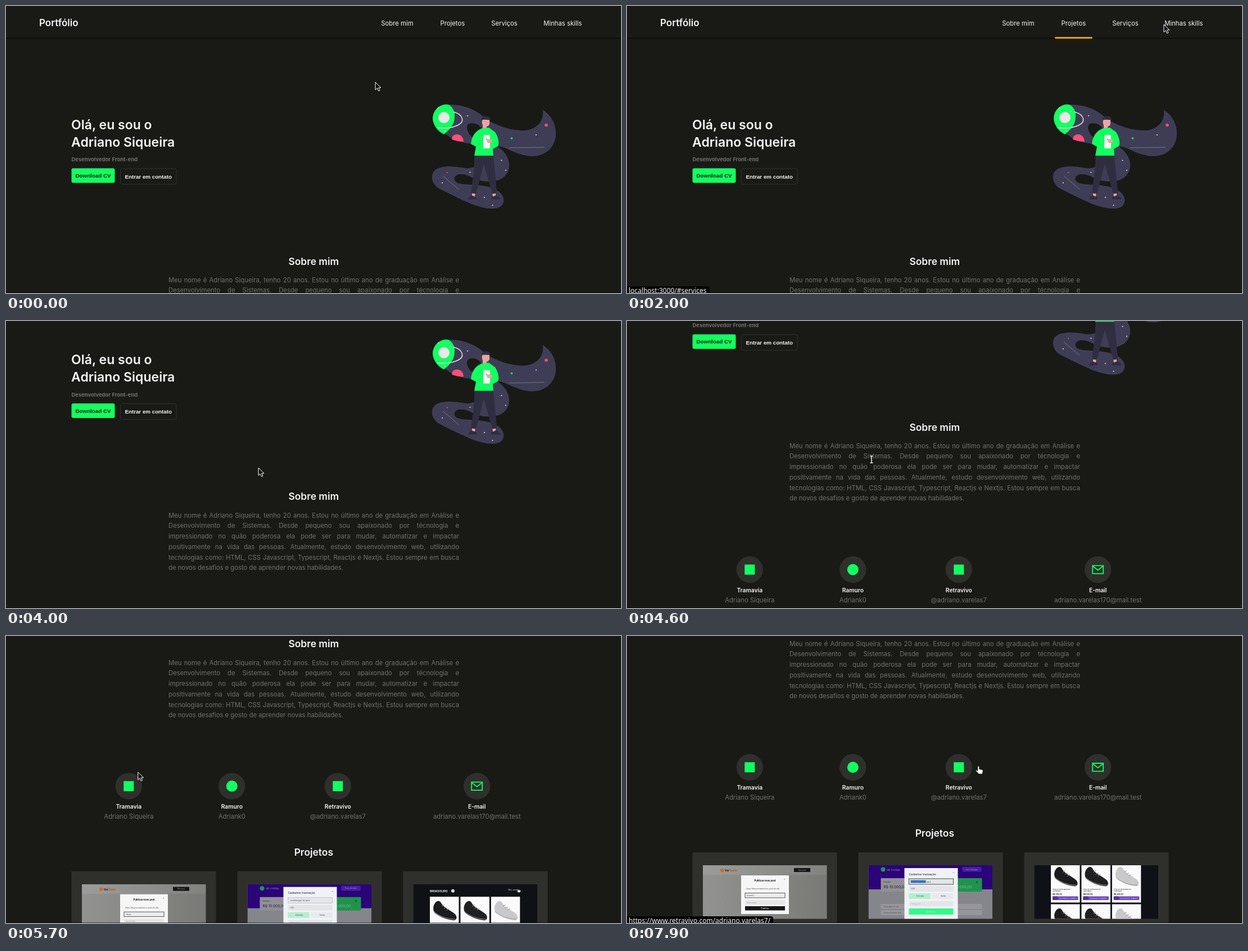
An HTML page for the animation above (8000 ms loop, 1094x512 px).

```html
<!DOCTYPE html>
<html lang="pt-BR">
<head>
<meta charset="utf-8">
<title>Portfólio</title>
<style>
html, body { margin: 0; width: 100%; height: 100%; overflow: hidden; background: #191a16; }
body { position: relative; font-family: Inter, sans-serif; }
#page, #page > svg, #cursor { position: absolute; left: 0; top: 0; }
#page { width: 1094px; height: 1000px; }
svg { font-family: Inter, sans-serif; fill: #f5f5f5; }
#about { position: absolute; left: 289px; top: 479.5px; width: 517px; font-size: 11.3px; line-height: 18.75px; color: #70716d; }
#about div { text-align: justify; text-align-last: justify; white-space: nowrap; height: 18.75px; }
#about div:last-child { text-align-last: left; }
#status { position: absolute; left: 0; top: 500px; height: 12px; padding: 0 5px 0 3px; overflow: hidden;
  background: #060606; color: #f2f2f2; border-radius: 0 4px 0 0; font: 12px/15px "Noto Sans", sans-serif; white-space: nowrap; }
#edge { position: absolute; left: 0; top: 510.5px; width: 100%; height: 1.5px; background: #0008; }
.c { text-anchor: middle; }
.h { font-size: 17.4px; font-weight: 600; }
.g { fill: #70716d; }
.btn { font: bold 9.77px "Liberation Sans", Arial, sans-serif; }
</style>
</head>
<body>
<div id="page">
<svg width="1094" height="1000">
  <rect y="57" width="1094" height="1.2" fill="#060606"/>
  <text x="59" y="36" font-size="17" font-weight="600">Portfólio</text>
  <g id="nav" class="c" font-size="11.3"></g>
  <rect id="line" y="55.3" height="2.9" rx="1.4" fill="#eda321"/>

  <g font-size="23" font-weight="600">
    <text x="116" y="219.5">Olá, eu sou o</text>
    <text x="116" y="250.5">Adriano Siqueira</text>
  </g>
  <text class="g" x="116.5" y="277" font-size="9.45" font-weight="700">Desenvolvedor Front-end</text>
  <rect x="116.5" y="289.5" width="77" height="26" rx="3" fill="#13ff60"/>
  <text class="btn c" x="155" y="306" fill="#191a16">Download CV</text>
  <rect x="203.5" y="290" width="99.5" height="28" rx="3" fill="none" stroke="#32332f"/>
  <text class="btn c" x="253.2" y="307.5">Entrar em contato</text>

  <g id="art">
    <path fill="#3f3d56" d="M787 176C815 175 836 186 850 198C872 216 905 223 925 222C948 218 957 203 955 185C972 197 979 213 978 231C976 254 958 268 936 268C908 267 893 252 872 249C890 260 896 274 895 288C892 306 876 314 856 313C832 312 826 300 808 300C796 301 794 312 804 316C822 321 850 316 872 328C886 336 889 348 881 357C870 366 845 360 825 352C805 343 785 333 771 326C757 318 755 303 761 295C770 284 795 285 815 289C832 292 845 282 848 268L838 246C815 246 795 240 782 228C765 214 765 180 787 176Z"/>
    <path fill="#191a16" d="M820 216C820 208 832 207 840 212L850 222 832 236C824 231 820 223 820 216Z"/>
    <path fill="#13ff60" d="M787 176C777 173 759 182 759 201C760 213 768 224 779 229C788 222 798 212 798 198C799 188 794 179 787 176Z"/>
    <circle cx="779" cy="199" r="10" fill="#e8e8e8"/>
    <path fill="none" stroke="#e6e6e6" stroke-width="1.4" d="M796 189C812 193 818 206 803 213C792 218 778 219 768 217"/>
    <path fill="#fb4f78" d="M793 238C793 226 813 225 814 242Q803 242 793 238Z"/>
    <path fill="none" stroke="#77767f" d="M895 253 958 252M777 303 805 327"/>
    <circle cx="961" cy="212.5" r="2.8" fill="#fb4f78"/><circle cx="785" cy="297" r="1" fill="#fb4f78"/>
    <circle cx="899.5" cy="236" r="1.8" fill="#13ff60"/>
    <g id="stars"></g>
    <path fill="#eba5a0" d="M847 203h13v8q-2 4-5 4v6h-7v-8q-2-4-1-10ZM829 331h6l-1 9h-5ZM865 331h6v9h-5Z"/>
    <path fill="#2f2e41" d="M846 205Q844 197 853 196.500Q863 197 862 204L860 202H849ZM833 266H867C869 290 872 315 873 334L865 335 850 282 836 335 827 334C830 310 834 290 833 266ZM822 345Q822 340 829 338L837 341V345ZM863 345V341L871 338Q880 340 880 345Z"/>
    <path fill="#13ff60" d="M847 218 859 217 870 225C876 234 878 246 875 250L866 255 867 267H833L836 251 827 246C828 235 833 223 847 218Z"/>
    <rect x="849" y="230" width="12" height="24" rx="1.500" fill="#f5f5f5"/>
    <circle cx="855" cy="238" r="1.500" fill="#13ff60"/><ellipse cx="860" cy="241" rx="4.500" ry="3.500" fill="#eba5a0"/>
  </g>

  <text class="h c" x="547.3" y="461.5">Sobre mim</text>
  <g id="social" class="c"></g>
  <text class="h c" x="547.3" y="833">Projetos</text>
  <g fill="#2f302c"><path d="M116.500 861h257v139h-257ZM411.500 861h257v139h-257ZM706.500 861h257v139h-257Z"/></g>

  <svg x="135" y="884" width="220.500" height="95.500" font-size="3.600">
    <defs><linearGradient id="dim"><stop stop-color="#9c9c9a"/><stop offset="1" stop-color="#82827f"/></linearGradient></defs>
    <rect width="221" height="96" fill="url(#dim)"/>
    <rect y="17" width="221" height="79" fill="#0001"/>
    <circle cx="34" cy="9" r="3" fill="#d9640f"/>
    <text x="38.500" y="11" font-size="5.200" font-weight="700" fill="#27221c">Vai<tspan fill="#b0560f">Texto</tspan></text>
    <rect x="162" y="5" width="29" height="7" fill="#151515"/>
    <text class="c" x="176.500" y="9.700" font-size="2.800" fill="#aaa">Novo post</text>
    <rect x="68" y="18" width="85" height="69" fill="#f6f6f6"/>
    <g fill="#444">
      <text x="144" y="26" font-size="4">×</text>
      <text class="c" x="110.500" y="29" font-size="4.200" font-weight="700" fill="#111">Publicar novo post</text>
      <text x="77" y="43" font-size="3.200">https://blog.exemplo/novo-post-do-dia</text>
      <rect x="75" y="49.500" width="71" height="8.500" fill="#ececec" stroke="#333" stroke-width=".8"/>
      <text id="typed" x="78" y="55"></text>
      <rect x="75" y="62" width="71" height="8.500" fill="#e6e6e6"/>
      <text x="78" y="67.500" fill="#999">Descrição</text>
      <rect x="75" y="73" width="71" height="7.500" fill="#161616"/>
      <text class="c" x="110.500" y="78" fill="#fff">Publicar</text>
    </g>
  </svg>

  <svg x="429.500" y="884" width="220.500" height="95.500" font-size="3.600">
    <rect width="221" height="96" fill="#85868c"/><rect width="221" height="43" fill="#2b0478"/>
    <circle cx="26" cy="7.500" r="4" fill="#189a4c"/>
    <text x="33" y="9.500" font-size="5" fill="#918aa8">ab contas</text>
    <rect x="167" y="3" width="34" height="8.500" rx="1" fill="#4620a2"/>
    <text class="c" x="184" y="8.500" font-size="2.800" fill="#9a8dc0">Nova transação</text>
    <rect x="22" y="23" width="60" height="24" rx="1" fill="#909096"/>
    <text x="27" y="31" font-size="3" fill="#333">Entradas</text>
    <text x="27" y="41" font-size="6.500" fill="#252535">R$ 10.000,00</text>
    <rect x="140" y="23" width="62" height="24" rx="1" fill="#1f934c"/><circle cx="193" cy="30" r="2" fill="#126b35"/>
    <text x="146" y="41" font-size="6.500" fill="#87b397">R$ 8.000,00</text>
    <g fill="#96969c"><path d="M22 69h180v9H22ZM22 80h180v9H22Z"/></g>
    <g font-size="3" fill="#4b4b5c"><text x="27" y="75">Publicidade de site</text><text x="27" y="86">Desenvolvimento web</text></g>
    <rect x="64" y="5" width="95" height="91" fill="#f0f2f5"/>
    <g fill="#454a5e">
      <text x="72" y="17.500" font-size="4.900" font-weight="600">Cadastrar transação</text><text x="150" y="14">×</text>
      <rect id="field" x="72" y="24" width="79" height="10" fill="#e3e5e9"/>
      <rect id="sel" x="75" y="26.500" width="27" height="5" fill="#3978d8"/>
      <text x="76" y="30.500">contribuição de abril</text>
      <rect x="72" y="37" width="79" height="10" fill="#e3e5e9"/><text x="76" y="43.300">500</text>
      <rect x="72" y="50" width="38" height="10" fill="#b2efcd"/><text class="c" x="92" y="56.300">Entrada</text>
      <rect x="113" y="50" width="38" height="10" fill="#e8e9ed"/><text class="c" x="133" y="56.300">Saída</text>
      <rect x="72" y="64" width="79" height="9" fill="#e3e5e9"/><text x="76" y="70" fill="#a5a8b4">Categoria</text>
      <rect x="72" y="77" width="79" height="11" rx="1" fill="#32f98a"/><text class="c" x="111" y="83.800" fill="#bfffd9">Cadastrar</text>
    </g>
  </svg>

  <svg x="724.500" y="884" width="220.500" height="95.500">
    <rect width="221" height="96" fill="#101116"/>
    <g id="shop">
      <text x="29.500" y="14" font-size="4.600" font-weight="700">BRISKSOLERS</text>
      <circle cx="70.500" cy="12" r="3" fill="#ddd"/>
      <text x="169" y="11.500" font-size="3.200">Meu carrinho</text><path d="M185 11h6l-1 3.500h-4Z"/>
    </g>
  </svg>
</svg>
<div id="about">
  <div>Meu nome é Adriano Siqueira, tenho 20 anos. Estou no último ano de graduação em Análise e</div>
  <div>Desenvolvimento de Sistemas. Desde pequeno sou apaixonado por técnologia e</div>
  <div>impressionado no quão poderosa ela pode ser para mudar, automatizar e impactar</div>
  <div>positivamente na vida das pessoas. Atualmente, estudo desenvolvimento web, utilizando</div>
  <div>tecnologias como: HTML, CSS Javascript, Typescript, Reactjs e Nextjs. Estou sempre em busca</div>
  <div>de novos desafios e gosto de aprender novas habilidades.</div>
</div>
</div>
<div id="edge"></div>
<div id="status"></div>
<svg id="cursor" width="1094" height="512"><path id="pointer"/></svg>

<script>
const $ = id => document.getElementById(id);
const add = (id, markup) => $(id).insertAdjacentHTML('beforeend', markup);

const nav = [['Sobre mim', 696], ['Projetos', 794.3], ['Serviços', 886.5], ['Minhas skills', 990.3]];
nav.forEach(([label, x]) => add('nav', `<text x="${x}" y="34.500">${label}</text>`));
// Left edge and width of the underline below each menu item
const lines = [[655.5, 82], [761, 67], [852, 69.5], [945, 91]];

[[821, 196], [943, 230], [881.5, 275.5], [889, 293], [825.5, 296.5], [776, 315.5], [851, 341.5], [865.5, 355.5],
 [769, 182], [790, 188], [781, 223]]
  .forEach(([x, y]) => add('stars', `<circle cx="${x}" cy="${y}" r="1"/>`));

const square = '<rect x="-9" y="-9" width="18" height="18" fill="#13ff60"/>';
const disc = '<circle r="10" fill="#13ff60"/>';
const mail = '<path d="M-9.500-7.200h19v14.400h-19ZM-9.500-6.500 0 1 9.500-6.500" fill="none" stroke="#13ff60" stroke-width="1.800"/>';
[[218.3, 'Tramavia', 'Adriano Siqueira', square], [401.8, 'Ramuro', 'Adriank0', disc],
 [590.3, 'Retravivo', '@adriano.varelas7', square], [837.7, 'E-mail', 'adriano.varelas170@mail.test', mail]]
  .forEach(([x, name, user, icon]) => add('social', `<g transform="translate(${x} 709.200)">
    <circle r="23.700" fill="#2f302c"/>${icon}
    <text y="40" font-size="10.300" font-weight="600">${name}</text>
    <text class="g" y="58" font-size="11.300">${user}</text></g>`));

const shoes = [['#1c1c1e', '179,90'], ['#202022', '139,90'], ['#c9c9cb', '219,90']];
for (let row = 0; row < 2; row++) shoes.forEach(([color, price], i) => add('shop',
  `<g transform="translate(${29.5 + i * 54.4} ${22.5 + row * 74})" font-size="2.700" fill="#222">
    <rect width="51.500" height="71" fill="#fafafa"/>
    <path fill="${color}" d="M8 13C12 6 18 6 20 11C26 21 36 23 45 31C49 36 48 41 43 42C29 41 14 34 8 28C5 22 6 17 8 13Z"/>
    <path fill="none" stroke="#999" stroke-width="1" d="M7 26C15 34 30 40 45 40M21 17l5-3M25 21l5-3M29 24l5-3"/>
    <text x="3" y="48.500">Tênis de caminhada leve</text><text x="3" y="51.800">confortável</text>
    <text x="3" y="57" font-size="3.500" font-weight="700">R$ ${price}</text>
    <rect x="3" y="60" width="45.500" height="6.500" rx="1" fill="#6a45b8"/><rect x="3" y="60" width="9" height="6.500" rx="1" fill="#533591"/>
    <text class="c" x="30" y="64.300" font-size="2.500" fill="#fff">ADICIONAR AO CARRINHO</text></g>`));

const shapes = {
  arrow: ['M0 0V13.500L3.300 10.600 5.600 15.600 8 14.600 5.700 9.800H10Z', '#111', '#fff', 1],
  hand: ['M2 1.200Q3.300-.6 4.400 1V5.500L10 6.800Q11.300 7.200 11 9L10 14H4L-1.500 8.500Q-1 6.800 .8 7.800L2 8.800Z', '#fff', '#222', .5],
  beam: ['M-2.500-6H2.500M0-6V6M-2.500 6H2.500', 'none', '#eee', 1.5]
};
const moves = [[0, 657, 136], [100, 679, 110], [200, 679, 110], [400, 686, 58], [500, 692, 37], [700, 706, 33],
  [900, 782, 31], [1100, 834, 35], [1300, 878, 34], [1500, 950, 33], [1700, 992, 35], [1900, 992, 35],
  [2000, 955, 33], [2200, 800, 92], [2500, 450, 215], [2800, 212, 275], [3100, 340, 245], [3300, 449, 262],
  [4300, 449, 262], [4600, 435, 247], [5200, 276, 250], [5400, 273, 252], [5800, 222, 240], [6100, 214, 232],
  [6400, 230, 217], [6700, 345, 240], [7000, 398, 236], [7100, 398, 236], [7300, 424, 219], [7600, 540, 226], [7900, 622, 232]];
const scrolls = [[3500, 0], [3600, 14], [4000, 142.5], [4100, 158], [4300, 158], [4400, 176], [4600, 265.7],
  [4700, 281], [4900, 357], [5000, 370], [5400, 370], [5500, 388], [5800, 468], [5900, 475]];
const shopScroll = [[7100, 0], [7500, 27]];
const hover = [[0, -1], [500, 0], [800, 1], [1200, 2], [1500, 3], [2000, 1], [2200, -1]];
const kinds = [[0, 'arrow'], [500, 'hand'], [800, 'arrow'], [900, 'hand'], [1100, 'arrow'], [1300, 'hand'], [1400, 'arrow'],
  [1600, 'hand'], [2000, 'arrow'], [4500, 'beam'], [5000, 'arrow'], [5800, 'hand'], [7400, 'arrow'], [7600, 'hand']];
const local = 'localhost:3000/#', web = 'https://';
const links = [[0, ''], [500, local + 'about'], [900, local + 'projects'], [1300, local + 'services'], [1500, local + 'skills'],
  [2000, local + 'services'], [2300, ''], [5900, web + 'www.tramavia.com/in/adriano-siqueira-571cd348e/'],
  [6900, web + 'ramuro.com/Adriank0'], [7700, web + 'www.retravivo.com/adriano.varelas7/']];

const at = (keys, t) => keys.findLast(k => k[0] <= t)[1];
function glide(keys, t) {
  const i = keys.findIndex(k => k[0] > t);
  if (i < 1) return keys.at(i && -1).slice(1);
  const a = keys[i - 1], b = keys[i], p = (t - a[0]) / (b[0] - a[0]);
  return a.slice(1).map((v, n) => v + (b[n + 1] - v) * p);
}
function set(id, attrs) {
  for (const name in attrs) $(id).setAttribute(name, attrs[name]);
}

function draw(now) {
  const t = Math.floor(now % 8000 / 100) * 100;
  $('page').style.transform = `translateY(${-glide(scrolls, t)[0]}px)`;
  set('shop', { transform: `translate(0 ${-glide(shopScroll, t)[0]})` });

  const [x, y] = glide(moves, t), [d, fill, stroke, width] = shapes[at(kinds, t)];
  set('pointer', { d, fill, stroke, 'stroke-width': width, transform: `translate(${x} ${y})` });

  const [left, size] = lines[at(hover, t)] || [0, 0];
  set('line', { x: left, width: size });

  const link = at(links, t);
  $('status').textContent = link;
  $('status').style.display = link ? 'block' : 'none';

  $('typed').textContent = t < 7300 ? 'Título' : 'el post'.slice(0, (t - 7200) / 80) + '|';
  set('sel', { opacity: t < 7300 ? 0 : 1 });
  set('field', { stroke: t < 7300 ? '#b9bcc4' : '#222', 'stroke-width': .8 });
  requestAnimationFrame(draw);
}
draw(0);
</script>
</body>
</html>
```
